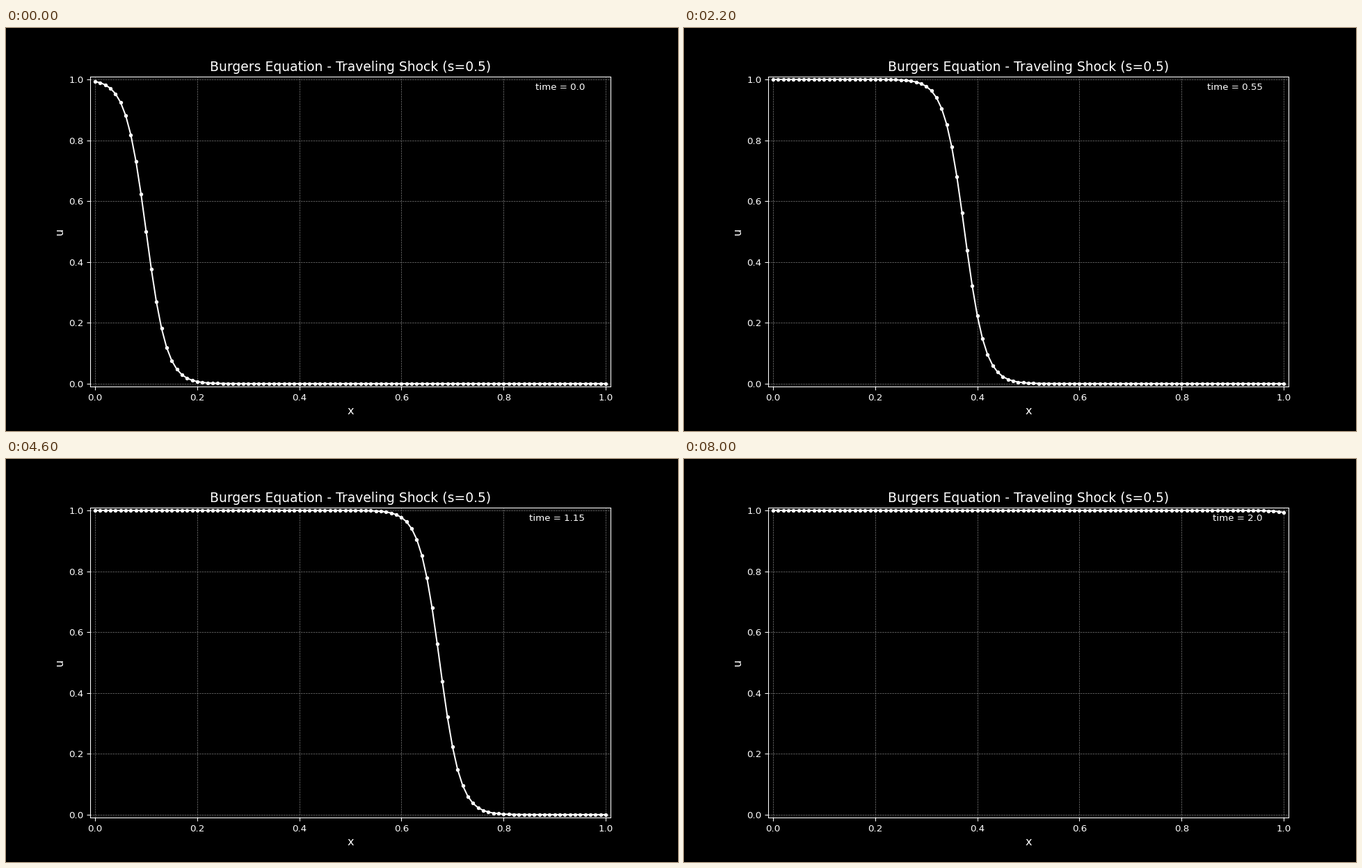
Write a matplotlib script that moves like this. It is 966x580 px and loops after 8200 ms.

```python
import numpy as np
import matplotlib.pyplot as plt
from matplotlib.animation import FuncAnimation

WIDTH, HEIGHT = 966, 580
DPI = HEIGHT / 6
FRAMES, INTERVAL = 41, 200
DT = 0.05        # simulated time per frame
SPEED = 0.5
START = 0.1      # initial shock position
NU = 0.01        # viscosity

plt.style.use("dark_background")
plt.rcParams["font.family"] = "DejaVu Sans"

x = np.linspace(0, 1, 101)


def wave(t):
    """Travelling shock solution, falling from 1 to 0."""
    return 0.5 * (1 - np.tanh((x - START - SPEED * t) / (4 * NU)))


# The tiny margin keeps the pixel size from being truncated downwards.
size = [(side + 1e-3) / DPI for side in (WIDTH, HEIGHT)]
fig, ax = plt.subplots(figsize=size, dpi=DPI)
fig.set_facecolor("black")
ax.set(xlim=(-0.01, 1.01), ylim=(-0.01, 1.01))
ax.set_title("Burgers Equation - Traveling Shock (s=0.5)", fontsize=14)
ax.set_xlabel("x", fontsize=12)
ax.set_ylabel("u", fontsize=12)
ax.grid(True, color="gray", linestyle="--", linewidth=0.5)

line, = ax.plot(x, wave(0), ".-", color="white")
label = ax.text(0.95, 0.95, "", ha="right", va="bottom",
                transform=ax.transAxes)


def update(i):
    t = round(i * DT, 2)
    line.set_ydata(wave(t))
    label.set_text(f"time = {t}")
    return line, label


anim = FuncAnimation(fig, update, frames=FRAMES, interval=INTERVAL,
                     repeat=True, repeat_delay=0)
plt.show()
```
